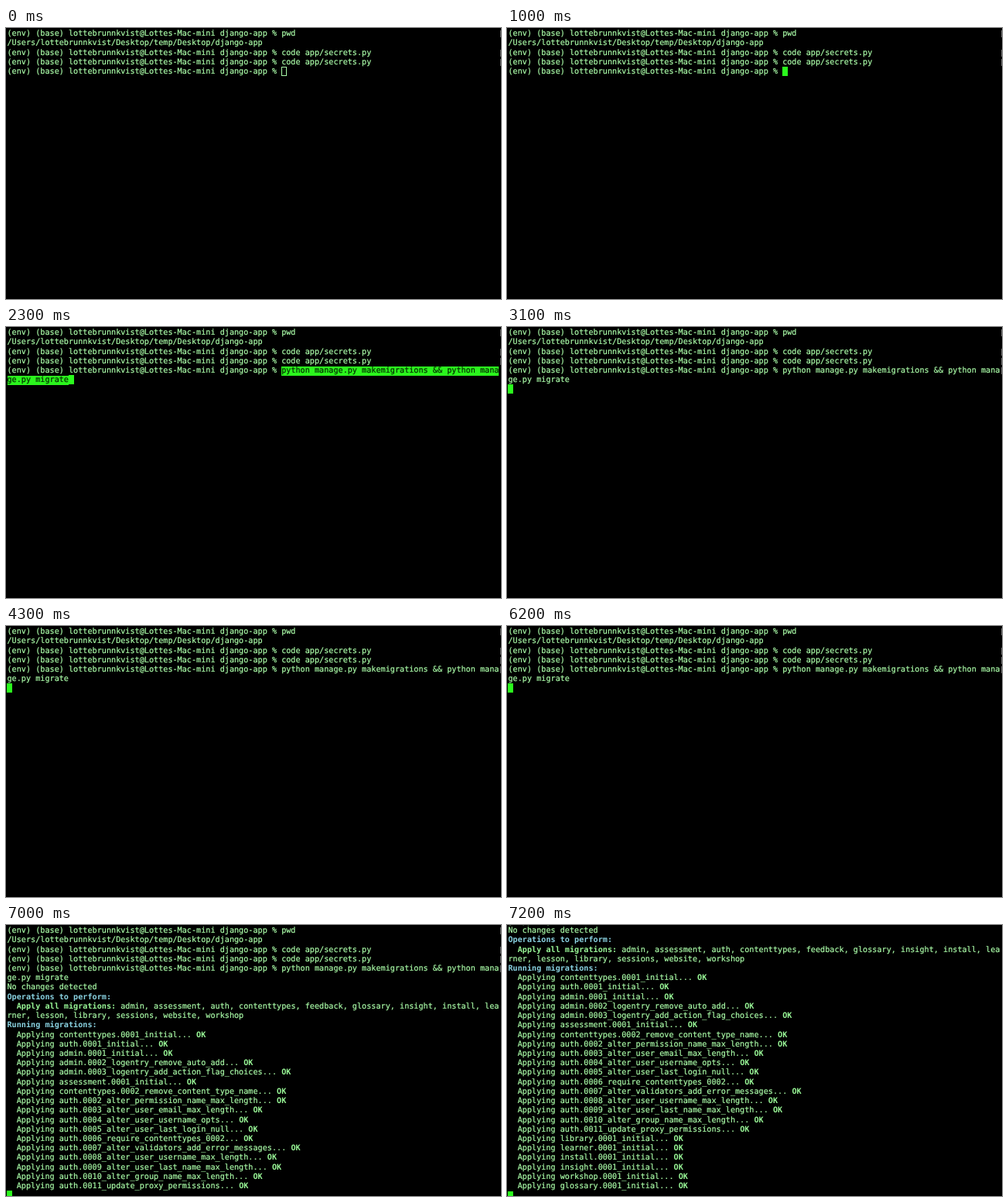
An HTML page for the animation above (7300 ms loop, 640x350 px).

```html
<!DOCTYPE html>
<html lang="en">
<head>
<meta charset="utf-8">
<title>Terminal: running migrations</title>
<style>
  html, body { margin: 0; width: 100%; height: 100%; overflow: hidden; background: #000; }
  #stage { position: relative; width: 640px; height: 350px; overflow: hidden; background: #000; }
  #screen { position: absolute; left: 0; top: 0; width: 640px; }
  .row {
    position: absolute; left: 1.5px; width: 638.5px; height: 12.22px;
    font: 10.167px/12.22px "DejaVu Sans Mono", "Noto Sans Mono", monospace;
    color: #a9fba7; white-space: pre; text-rendering: geometricPrecision;
    -webkit-text-stroke: 0.2px currentColor;
  }
  .row b { color: #98f696; -webkit-text-stroke: 0; }
  .row .head { color: #8ad3e2; }
  .mark::after {
    content: ""; position: absolute; right: 0; top: 1px;
    width: 1px; height: 9px; background: #666;
  }
  .paste { display: inline-block; height: 12.22px; vertical-align: top; }
  .paste.on { background: #2bf51d; color: #042c02; }
  #cursor { position: absolute; box-sizing: border-box; width: 7px; height: 12px; background: #2bfa1d; }
  #cursor.hollow { background: none; border: 1px solid #a9fba7; }
</style>
</head>
<body>
<div id="stage"><div id="screen"><div id="cursor"></div></div></div>
<script>
const LOOP = 7300, LINE = 12.22, CELL = 6.12, LEFT = 1.5, TOP = 2.1, ROWS = 29;
const FOCUS = 600, PASTE = 1100, ENTER = 2400, BLINK = 3600, OUTPUT = 6600;

const user = "lottebrunnkvist";
const prompt = `(env) (base) ${user}@Lottes-Mac-mini django-app % `;
const shell = [
  prompt + "pwd",
  `/Users/${user}/Desktop/temp/Desktop/django-app`,
  prompt + "code app/secrets.py",
  prompt + "code app/secrets.py",
  prompt + '<span class="paste">python manage.py makemigrations &amp;&amp; python mana</span>',
  '<span class="paste">ge.py migrate</span>'
];

const initial = app => app + ".0001_initial";
const auth = name => "auth." + name;
const migrations = [
  ...["contenttypes", "auth", "admin"].map(initial),
  "admin.0002_logentry_remove_auto_add",
  "admin.0003_logentry_add_action_flag_choices",
  initial("assessment"),
  "contenttypes.0002_remove_content_type_name",
  ...[
    "0002_alter_permission_name_max_length",
    "0003_alter_user_email_max_length",
    "0004_alter_user_username_opts",
    "0005_alter_user_last_login_null",
    "0006_require_contenttypes_0002",
    "0007_alter_validators_add_error_messages",
    "0008_alter_user_username_max_length",
    "0009_alter_user_last_name_max_length",
    "0010_alter_group_name_max_length",
    "0011_update_proxy_permissions"
  ].map(auth),
  ...["library", "learner", "install", "insight", "workshop", "glossary"].map(initial)
];
const output = [
  "No changes detected",
  '<b class="head">Operations to perform:</b>',
  "<b>  Apply all migrations:</b> admin, assessment, auth, contenttypes, feedback, glossary, insight, install, lea",
  "rner, lesson, library, sessions, website, workshop",
  '<b class="head">Running migrations:</b>',
  ...migrations.map(m => `  Applying ${m}... <b>OK</b>`)
];
// Output lines printed after each 100 ms
const printed = [1, 9, 15, 18, 22, 25, 28];

const screen = document.getElementById("screen");
const cursor = document.getElementById("cursor");
const rows = [...shell, ...output].map((html, i) => {
  const row = document.createElement("div");
  row.className = "row";
  row.innerHTML = html;
  row.style.top = TOP + i * LINE + "px";
  screen.insertBefore(row, cursor);
  return row;
});
[0, 2, 3].forEach(i => rows[i].classList.add("mark"));
const pasted = [...document.querySelectorAll(".paste")];

function placeCursor(col, row) {
  cursor.style.left = Math.round(LEFT + col * CELL - 0.4) + "px";
  cursor.style.top = Math.round(TOP + row * LINE - 1) + "px";
}

function draw(t) {
  const step = Math.min(printed.length - 1, Math.floor((t - OUTPUT) / 100));
  const count = shell.length + (step < 0 ? 0 : printed[step]);
  rows.forEach((row, i) => { row.style.display = i < count ? "" : "none"; });
  rows[4].classList.toggle("mark", t >= ENTER);

  for (const part of pasted) {
    part.style.visibility = t < PASTE ? "hidden" : "";
    part.classList.toggle("on", t < ENTER);
  }

  if (t < PASTE) placeCursor(prompt.length, 4);
  else if (t < ENTER) placeCursor(13, 5);
  else placeCursor(0, count);

  const off = t >= BLINK && t < OUTPUT && (t - BLINK) % 1000 < 500;
  cursor.style.visibility = off ? "hidden" : "";
  cursor.classList.toggle("hollow", t < FOCUS);
  screen.style.top = -Math.max(0, count + 1 - ROWS) * LINE + "px";
}

const start = performance.now();
function tick() {
  draw((performance.now() - start) % LOOP);
  requestAnimationFrame(tick);
}
tick();
</script>
</body>
</html>
```
